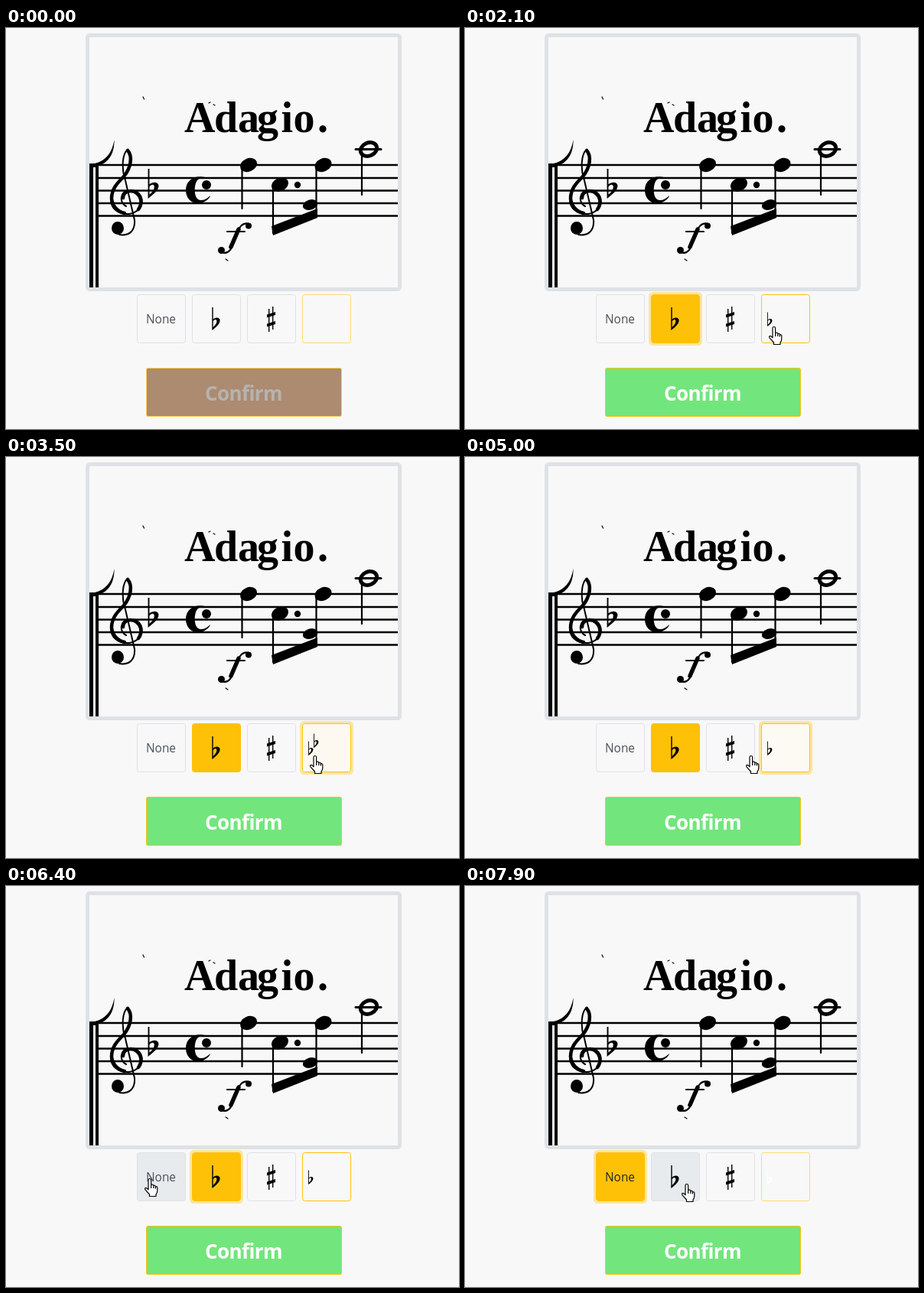
An HTML page for the animation above (8 s loop, 592 by 524 pixels).

```html
<!DOCTYPE html>
<html lang="en">
<head>
<meta charset="utf-8">
<title>Key signature picker</title>
<style>
  html, body { margin: 0; width: 100%; height: 100%; overflow: hidden; background: #f8f8f8; }
  svg { display: block; }
  text { font-family: "Open Sans", "Noto Sans", sans-serif; }
  .line { fill: none; stroke: #000; stroke-linecap: round; }
  .ring { fill: none; stroke: #ffc107; stroke-opacity: .36; stroke-width: 3; }
</style>
</head>
<body>
<svg width="592" height="524" viewBox="0 0 592 524">
  <defs>
    <path id="flat" d="M-.7 0H.7V15.6C4 12.4 9.6 13 9.6 17.2C9.6 21.5 5 25.5-.7 30ZM.7 18V26C4 23 5.4 20.5 5.4 18C5.4 15 2.3 15.4.7 18Z"/>
    <ellipse id="head" rx="11.5" ry="8.6" transform="rotate(-24)"/>
  </defs>

  <rect x="106.5" y="9.5" width="408" height="332" rx="3" fill="#f8f8f8" stroke="#dee2e6" stroke-width="5"/>

  <g id="score">
    <path class="line" style="stroke-linecap:butt" stroke-width="2.6" d="M112 179H512M118 196H512M118 212.5H512M118 229H512M118 245.5H512"/>
    <path d="M109 177H121V339H117V182H114V339H109Z"/>
    <path d="M141.5 146C139 163 130 174 116 177L117 181C133 178 142 165 141.5 146Z"/>

    <!-- treble clef -->
    <g class="line">
      <path stroke-width="2" d="M157 233C148 229 148 213 162 212C182 211 184 239 161 243C146 244 136 235 137 222M155 197C151 182 152 164 159 159M155 195L168 251C169 266 160 272 148 270"/>
      <path stroke-width="4.5" d="M159 160C166 168 163 183 154 194C144 204 138 211 138 223C139 233 146 240 155 242"/>
      <path stroke-width="4.5" d="M153 222C153 215 160 211 168 214C177 219 179 229 173 237"/>
    </g>
    <ellipse cx="146" cy="261.5" rx="8" ry="8.5"/>

    <use href="#flat" transform="translate(186.5 184) scale(1.35 1.3)"/>

    <!-- common time -->
    <path d="M260 195C245 192 235 200 235 212C235 225 246 232 257 228C262 226 266 223 267 219C261 225 254 227 250 223C245 218 246 202 251 198C254 196 257 196 260 197Z"/>
    <circle cx="262" cy="205" r="6"/>

    <!-- notes -->
    <use href="#head" x="317" y="179"/>
    <use href="#head" x="358" y="204.500"/>
    <use href="#head" x="414.500" y="179"/>
    <circle cx="381" cy="205" r="4.200"/>
    <path class="line" stroke-width="2.2" d="M308.500 183V236M349 205V268M405.500 183V244M465 163V218"/>
    <path d="M347 259L407 236V248L349 271Z"/>
    <ellipse cx="397.500" cy="231" rx="10" ry="6.500" transform="rotate(-18 397.500 231)"/>
    <ellipse cx="474" cy="158.500" rx="11" ry="8.500" fill="#f8f8f8" stroke="#000" stroke-width="5" transform="rotate(-24 474 158.500)"/>
    <path class="line" stroke-width="3" d="M457 158.500H490"/>

    <!-- forte -->
    <path class="line" stroke-width="2.200" d="M282 293C292 297 296 286 300 274C304 260 309 253 318 256M289 266H312"/>
    <path class="line" stroke-width="5.500" d="M304 263L294 286"/>
    <circle cx="281.500" cy="290.500" r="4.500"/>
    <circle cx="317" cy="258.500" r="4"/>

    <text y="136" x="233 272 303 328 359.500 375.500 407" style="font:bold 56px 'Liberation Serif',serif">Adagio.</text>
    <path class="line" stroke-width="1.200" d="M179 90L180.500 93M265 98L267 97M271 100L273 101M287 302L290 304"/>
  </g>

  <g id="none">
    <rect class="box" x="171.500" y="348.500" width="63" height="63" rx="3"/>
    <rect class="ring" x="169.500" y="346.500" width="67" height="67" rx="4"/>
    <text id="noneText" x="202.500" y="386" text-anchor="middle" font-size="15.400">None</text>
  </g>
  <g id="flatBtn">
    <rect class="box" x="243.500" y="348.500" width="63" height="63" rx="3"/>
    <rect class="ring" x="241.500" y="346.500" width="67" height="67" rx="4"/>
    <use href="#flat" x="270" y="365"/>
  </g>
  <g id="sharpBtn">
    <rect x="315.500" y="348.500" width="63" height="63" rx="3" fill="#f8f8f8" stroke="#dee2e6"/>
    <path class="line" style="stroke-linecap:butt" stroke-width="1.400" d="M343.700 367V397M348.700 364V394"/>
    <path d="M341 374.500L352 371V375L341 378.500ZM341 386.500L352 383V387L341 390.500Z"/>
  </g>
  <g id="sig">
    <rect class="box" x="387.500" y="348.500" width="63" height="63" rx="3"/>
    <rect class="ring" x="385.500" y="346.500" width="67" height="67" rx="4"/>
    <g id="flats"></g>
  </g>

  <g id="confirm">
    <rect id="confirmBox" x="183.500" y="444.500" width="255" height="63" rx="2"/>
    <text id="confirmText" x="310.500" y="487" text-anchor="middle" font-size="26" font-weight="700" letter-spacing="-.6">Confirm</text>
  </g>

  <g id="hand" stroke="#000" stroke-width="1.200" stroke-linejoin="round">
    <path fill="#fff" d="M5 14V2.300a1.800 1.800 0 0 1 3.600 0V8.200q3.200-.6 3.200 1.200 2.600-.4 2.600 1.200 2.400-.2 2.400 1.600V16q0 3-1.800 5v2.500H6.500V21L1 14.800q-1-2 .8-2.400 1.400 0 3.200 2.400z"/>
    <path fill="none" d="M8.600 8.200V13M11.800 9.400V13M14.400 10.600V13.500"/>
  </g>
</svg>
<script>
const LOOP = 8000, STEP = 100, FADE = 150;
const $ = id => document.getElementById(id);
const PAPER = [248, 248, 248], GREY = [231, 235, 238], AMBER = [255, 193, 7], CREAM = [253, 250, 244];

// time, then the pointer's fingertip
const path = [
  [200, 564, 49], [400, 470, 190], [600, 292, 362], [700, 268, 379], [800, 268, 379],
  [1000, 264, 373], [1800, 264, 373], [2000, 362, 385], [2100, 404, 390], [4900, 404, 390],
  [5000, 374, 390], [5200, 285, 384], [5400, 275, 383], [5700, 275, 383], [5900, 200, 383],
  [6000, 200, 383], [6200, 266, 383], [6400, 188, 382], [6600, 188, 382], [6900, 272, 384],
  [7300, 272, 384], [7500, 450, 388], [7700, 205, 385], [7900, 290, 389], [8000, 290, 389]
];
const clicks = [
  [1300, 'flatBtn'], [2400, 'sig'], [5400, 'flatBtn'], [5900, 'none'],
  [6200, 'flatBtn'], [6500, 'none'], [7300, 'flatBtn'], [7700, 'none']
];
const presses = [2400, 2800, 3100, 3500, 3900, 4100, 4300];
const counts = [[1300, 1], [2500, 2], [3600, 3], [3900, 4], [4100, 5], [4300, 6], [4500, 7], [4800, 1]];
const staffSteps = [0, -3, 1, -2, 2, -1, 3];

$('flats').innerHTML = staffSteps.map((s, i) =>
  `<use href="#flat" transform="translate(${395.5 + 7 * i} ${371.5 + 3.3 * s}) scale(.62)"/>`).join('');

const clamp = v => Math.max(0, Math.min(1, v));
const mix = (a, b, p) => a.map((v, i) => v + (b[i] - v) * p);
const last = (list, t) => list.filter(e => e[0] <= t).pop();

function pointer(t) {
  const i = path.findIndex(k => k[0] > t);
  const a = path[i - 1], b = path[i];
  return a && mix(a, b, (t - a[0]) / (b[0] - a[0])).slice(1);
}

function paint(id, fill, stroke, focused) {
  const box = $(id).querySelector('.box');
  box.setAttribute('fill', `rgb(${fill})`);
  box.setAttribute('stroke', stroke);
  $(id).querySelector('.ring').style.display = focused ? '' : 'none';
}

function draw(t) {
  const tip = pointer(t);
  $('hand').style.display = tip ? '' : 'none';
  if (tip) $('hand').setAttribute('transform', `translate(${tip[0] - 7} ${tip[1]})`);

  const focus = (last(clicks, t) || [])[1];
  const chosen = last(clicks.filter(c => c[1] !== 'sig'), t);
  const over = (x, y = tip) => y && y[0] >= x && y[0] < x + 64 && y[1] > 347 && y[1] < 412;

  for (const [id, x] of [['none', 171], ['flatBtn', 243]]) {
    const on = chosen && chosen[1] === id;
    const rest = over(x) ? GREY : PAPER;
    const p = on ? clamp((t - chosen[0] + 40) / FADE) : 0;
    paint(id, mix(rest, AMBER, p), on ? '#ffc107' : '#dee2e6', focus === id);
  }
  $('noneText').setAttribute('fill', chosen && chosen[1] === 'none' ? '#212529' : '#495057');

  const live = chosen && chosen[1] === 'flatBtn';
  const press = presses.filter(p => p <= t).pop();
  const flash = press ? Math.max(0, .3 - Math.abs(t - press - 100) / 350) : 0;
  const base = focus === 'sig' ? CREAM : PAPER;
  paint('sig', mix(base, AMBER, flash), live ? '#ffc107' : '#ffda6c', focus === 'sig');

  const n = (last(counts, t) || [0, 0])[1];
  $('flats').setAttribute('fill', live ? '#000' : '#fff');
  [...$('flats').children].forEach((f, i) => f.style.display = i < n ? '' : 'none');

  $('confirmBox').setAttribute('fill', chosen ? '#73e57d' : '#ac8b70');
  $('confirmBox').setAttribute('stroke', chosen ? '#ffc107' : '#ffd04a');
  $('confirmText').setAttribute('fill', chosen ? '#fff' : '#b6b3b0');
}

function tick() {
  const t = performance.now() % LOOP;
  draw(Math.floor(t / STEP) * STEP);
  requestAnimationFrame(tick);
}
tick();
</script>
</body>
</html>
```
